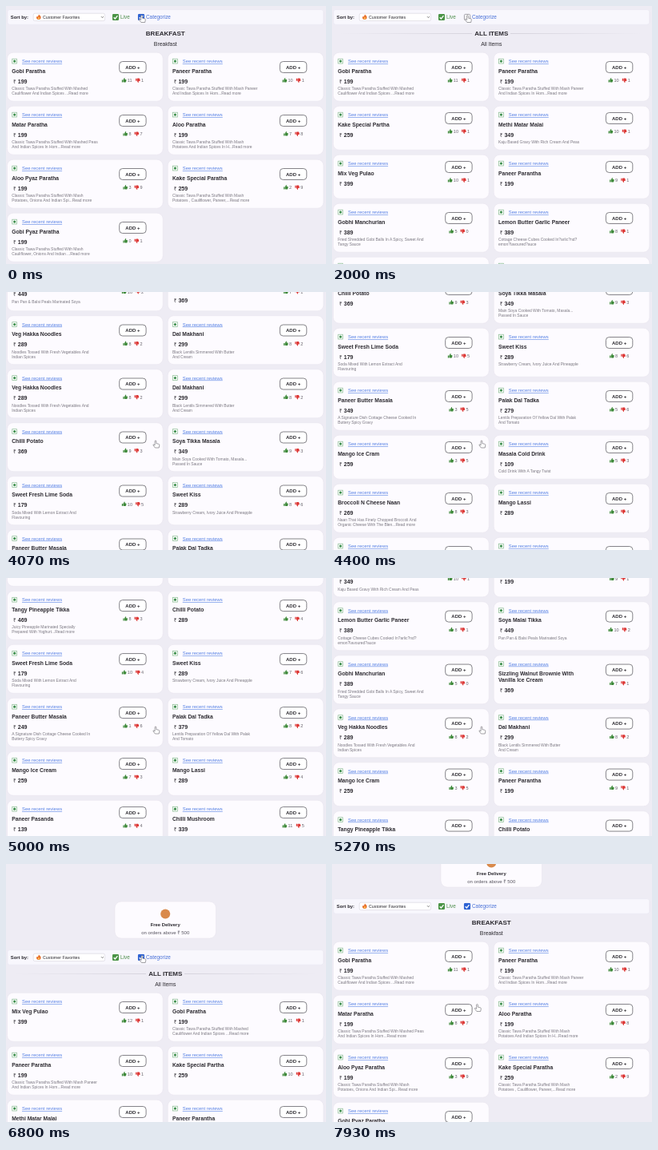
These frames come from a looping animation (400 by 323 pixels, 8 s). An HTML page:

```html
<!DOCTYPE html>
<html lang="en">
<head>
<meta charset="utf-8">
<title>Menu sorting</title>
<style>
  html, body { margin: 0; width: 100%; height: 100%; overflow: hidden; background: #eeecf4; }
  svg { display: block; width: 100vw; height: 100vh; font-family: "Liberation Sans", Arial, sans-serif; fill: #2c2a30; }
  .b { font-weight: bold; }
  .link { font-size: 5.9px; fill: #5681e4; text-decoration: underline; text-decoration-thickness: .5px; }
  .name { font-size: 6.75px; font-weight: bold; }
  .price { font-size: 7.1px; font-weight: bold; }
  .desc { font-size: 4.96px; fill: #7b7881; }
  .count { font-size: 5.5px; fill: #65626a; }
  .card { fill: #fdfbff; stroke: #e4e1eb; stroke-width: .5; }
  .mid { text-anchor: middle; }
</style>
</head>
<body>
<svg id="stage" viewBox="0 0 400 323" preserveAspectRatio="none">
  <defs>
    <path id="thumb" d="M0 2.3h1.3v3H0zM1.7 2.3 3 0q1 0 .8 1.2L3.6 2h1.6q.7.4.2 1.2.3.5-.1.9.1.5-.3.7 0 .6-.7.6H2.4l-.7-.4z"/>
    <path id="tick" d="M1.7 4.2 3.4 6 6.5 2.2" fill="none" stroke="#fff" stroke-width="1.3"/>
    <linearGradient id="fade">
      <stop offset="0" stop-color="#a5a1ae" stop-opacity="0"/>
      <stop offset="1" stop-color="#a5a1ae" stop-opacity=".55"/>
    </linearGradient>
  </defs>
  <rect width="400" height="323" fill="#eeecf4"/>
  <g id="page"></g>
  <g id="cursor" stroke="#66646a" stroke-width=".6" stroke-linejoin="round" fill="#fff">
    <path id="hand" d="M-.9 0q.9-1.2 1.7 0v3.1l3 .7q1.1.3 1 1.5l-.6 3.2H-.6L-3 5.3q-.2-1.3 1-.8L-.9 5.4z"/>
    <path id="arrow" d="M0 0v7l1.7-1.5L2.9 8.3l1.2-.5-1.2-2.7h2.2z"/>
  </g>
</svg>
<script>
const LOOP = 8000, STEP = 1000 / 15;
const $ = id => document.getElementById(id);

// Each dish: name | price | likes | dislikes | description ("/" breaks a line)
const mash = "Classic Tawa Paratha Stuffed With ";
const gobi = `Gobi Paratha|199|11|1|${mash}Mashed/Cauliflower And Indian Spices ...Read more`;
const paneer = `Paneer Paratha|199|10|1|${mash}Mash Paneer/And Indian Spices In Hom...Read more`;
const kake = "Kake Special Partha|259|10|1";
const methi = "Methi Matar Malai|349|10|1|Kaju Based Gravy With Rich Cream And Peas";
const parantha = "Paneer Parantha|199|9|1";
const manchurian = "Gobhi Manchurian|389|5|0|Fried Shredded Gobi Balls In A Spicy, Sweet And/Tangy Sauce";
const lemon = "Lemon Butter Garlic Paneer|389|8|1|Cottage Cheese Cubes Cooked In?arlic?nd?/emon?lavoured?auce";
const tikka = "Soya Malai Tikka|449|10|2|Pan Pan & Balsi Peals Marinated Soya";
const brownie = "Sizzling Walnut Brownie With/Vanilla Ice Cream|369|7|1";
const filler = [
  "Veg Hakka Noodles|289|8|2|Noodles Tossed With Fresh Vegetables And/Indian Spices",
  "Dal Makhani|299|8|2|Black Lentils Simmered With Butter/And Cream"];
const soda = "Sweet Fresh Lime Soda|179|10|5|Soda Mixed With Lemon Extract And/Flavouring";
const kiss = "Sweet Kiss|289|8|6|Strawberry Cream, Ivory Juice And Pineapple";
const masala = "Paneer Butter Masala|349|3|5|A Signature Dish Cottage Cheese Cooked In/Buttery Spicy Gravy";
const palak = "Palak Dal Tadka|279|5|6|Lentils Preparation Of Yellow Dal With Palak/And Tomato";
const iceCream = "Mango Ice Cram|259|3|5";
const lassi = "Mango Lassi|289|9|4";

const lists = {
  breakfast: [
    gobi, paneer,
    `Matar Paratha|199|8|7|${mash}Mashed Peas/And Indian Spices In Hom...Read more`,
    `Aloo Paratha|199|7|8|${mash}Mash/Potatoes And Indian Spices In H...Read more`,
    `Aloo Pyaz Paratha|199|3|9|${mash}Mash/Potatoes, Onions And Indian Spi...Read more`,
    `Kake Special Paratha|259|2|9|${mash}Mash/Potatoes , Cauliflower, Paneer,...Read more`,
    `Gobi Pyaz Paratha|199|0|1|${mash}Mash/Cauliflower, Onions And Indian ...Read more`],
  all: [
    gobi, paneer, kake, methi, "Mix Veg Pulao|399|10|1", parantha,
    manchurian, lemon, tikka, brownie, ...filler, ...filler,
    "Chilli Potato|369|9|3",
    "Soya Tikka Masala|349|9|3|Main Soya Cooked With Tomato, Masala.../Passed In Sauce",
    soda, kiss, masala, palak, iceCream,
    "Masala Cold Drink|109|5|3|Cold Drink With A Tangy Twist",
    "Broccoli N Cheese Naan|269|8|3|Naan That Has Finely Chopped Broccoli And/Organic Cheese With The Blen...Read more",
    lassi, ...filler],
  resorted: [
    "Mix Veg Pulao|399|12|1", gobi, paneer, kake, methi, parantha,
    lemon, tikka, manchurian, brownie, ...filler, iceCream, parantha,
    "Tangy Pineapple Tikka|469|8|3|Juicy Pineapple Marinated Specially/Prepared With Yoghurt...Read more",
    "Chilli Potato|289|7|4",
    soda.replace("|5|", "|4|"), kiss.replace("8|6", "7|6"), masala.replace("349|3|5", "249|1|6"),
    palak.replace("279|5|6", "379|8|2"), "Mango Ice Cream|259|7|3", lassi,
    "Paneer Pasanda|139|8|4", "Chilli Mushroom|339|11|5"]
};

const text = (x, y, s, cls, extra = "") =>
  `<text x="${x}" y="${y}" class="${cls}" ${extra}>${s.replace(/&/g, "&amp;")}</text>`;
const parse = s => {
  const [name, price, up, down, desc = ""] = s.split("|");
  return { names: name.split("/"), price, up, down, lines: desc ? desc.split("/") : [] };
};
const heightOf = d => d.lines.length > 1 ? 61 : d.names.length > 1 ? 57 : 55;

function votes(d, y) {
  const digit = 3.06;
  const width = 18.1 + digit * (d.up.length + d.down.length);
  const x1 = 158.5 - width / 2, n1 = x1 + 7;
  const x2 = n1 + digit * d.up.length + 4.1;
  return `<use href="#thumb" x="${x1}" y="${y - 2.9}" fill="#3f8a3b"/>` + text(n1, y + 2, d.up, "count") +
    `<use href="#thumb" transform="translate(${x2} ${y + 3}) scale(1 -1)" fill="#dd3a38"/>` +
    text(x2 + 7, y + 2, d.down, "count");
}

function card(d, x, y, h) {
  const shift = (d.names.length - 1) * 8, mid = h / 2;
  return `<g transform="translate(${x} ${y})">
    <rect class="card" x="1.5" y=".2" width="194.7" height="${h}" rx="7.5"/>
    <rect x="7.8" y="8.2" width="5.8" height="5.8" fill="#fff" stroke="#85b98d" stroke-width=".7"/>
    <circle cx="10.7" cy="11.1" r="1.6" fill="#3d8f4d"/>` +
    text(20, 13, "See recent reviews", "link") +
    d.names.map((s, i) => text(7.2, 25.5 + 7.6 * i, s, "name")).join("") +
    text(9, 38.5 + shift, "₹", "", 'font-size="6.4"') +
    text(14.7, 38.5 + shift, d.price, "price") +
    d.lines.map((s, i) => text(7.2, 47.2 + 6 * i + shift, s, "desc")).join("") +
    `<rect x="141.7" y="${mid - 19}" width="33.4" height="14" rx="4" fill="#fff" stroke="#5d5b62" stroke-width=".75"/>` +
    text(158.4, mid - 9.8, "ADD +", "b mid", 'font-size="6"') + votes(d, mid + 4.5) + "</g>";
}

function section(id, heading, label) {
  const dishes = lists[id].map(parse);
  let y = 58, out = "";
  for (let i = 0; i < dishes.length; i += 2) {
    const row = dishes.slice(i, i + 2), h = Math.max(...row.map(heightOf));
    row.forEach((d, col) => out += card(d, col * 200.7, y, h));
    y += h + 6;
  }
  const lines = id === "breakfast" ? "" :
    `<rect x="10" y="34" width="165" height=".6" fill="url(#fade)"/>
     <rect x="10" y="34" width="165" height=".6" fill="url(#fade)" transform="translate(398 0) scale(-1 1)"/>`;
  return `<g id="${id}">${lines}` + text(199.3, 36.6, heading, "b mid", 'font-size="8"') +
    text(199.3, 49.8, label, "mid", 'font-size="6.85"') + out + "</g>";
}

$("page").innerHTML =
  `<rect class="card" x="136" y="-56" width="126.5" height="46" rx="8"/>
   <circle cx="199.2" cy="-40.5" r="6" fill="#d98a4b"/>` +
  text(199.2, -25, "Free Delivery", "b mid", 'font-size="5.9"') +
  text(199.2, -15.4, "on orders above ₹ 500", "mid", 'font-size="6" fill="#55525c"') +
  `<rect x="1.8" y="4.6" width="395" height="18.6" rx="3" fill="#f8f7fd" stroke="#e5e2ee" stroke-width=".5"/>` +
  text(5.8, 16, "Sort by:", "b", 'font-size="5.9"') +
  `<rect x="34.2" y="9.2" width="89.4" height="9.4" rx="2" fill="#fff" stroke="#d5d2dc" stroke-width=".6"/>
   <path d="M41 10.6q2.8 2 2.6 4.4-.3 2.1-2.8 2.1T38 15q-.1-1.3.9-2.3l.6.8q1.3-1.2 1.5-2.9z" fill="#e8702c"/>
   <path d="M41 13.8q1.4 1.2.9 2.3-.9.9-1.9 0-.5-1 1-2.3z" fill="#ffce55"/>
   <path d="M119 13.2l1.4 1.4 1.4-1.4" fill="none" stroke="#444" stroke-width=".7"/>` +
  text(46, 15.8, "Customer Favorites", "", 'font-size="5.3"') +
  `<rect x="133" y="10" width="8" height="8" rx="1.2" fill="#4a9445"/><use href="#tick" x="133" y="10"/>` +
  text(143, 16.2, "Live", "", 'font-size="6.4" fill="#4f8f4c"') +
  `<rect id="box" x="165.4" y="10.4" width="7.2" height="7.2" rx="1.2" fill="#fff" stroke-width=".8"/>
   <g id="checked"><rect x="165" y="10" width="8" height="8" rx="1.2" fill="#2d62d3"/><use href="#tick" x="165" y="10"/></g>` +
  text(175, 16.2, "Categorize", "", 'font-size="6.4" fill="#4a72d8"') +
  section("breakfast", "BREAKFAST", "Breakfast") +
  section("all", "ALL ITEMS", "All Items") +
  section("resorted", "ALL ITEMS", "All Items");

const scrollKeys = [[3400, 0], [3730, 68], [4330, 533], [4940, 533], [5000, 499], [5530, -35], [5930, -35], [6600, -103], [7800, -103], [7930, -39]];
const xKeys = [[3270, 169.5], [3600, 187], [5930, 187], [6600, 170], [7200, 170], [7730, 181.5]];
const yKeys = [[3270, 12], [3600, 186.5], [5930, 186.5], [6600, 115], [7200, 115], [7730, 176]];

// Eased interpolation between [time, value] pairs, held at both ends
function at(keys, t) {
  const i = keys.findIndex(k => k[0] > t);
  if (i === 0) return keys[0][1];
  if (i < 0) return keys[keys.length - 1][1];
  const [t0, a] = keys[i - 1], [t1, b] = keys[i];
  const p = (t - t0) / (t1 - t0);
  return a + (b - a) * p * p * (3 - 2 * p);
}
const show = (id, on) => $(id).style.display = on ? "" : "none";

function draw(time) {
  const t = Math.floor((time % LOOP + 4) / STEP) * STEP + 4;
  $("page").setAttribute("transform", `translate(0 ${-at(scrollKeys, t)})`);
  show("breakfast", t < 1000 || t >= 7200);
  show("all", t >= 1000 && t < 5000);
  show("resorted", t >= 5000 && t < 7200);
  show("checked", t < 730 || t >= 6800);
  // Grey while hovered, blue once the pointer has left
  $("box").setAttribute("stroke", t < 3270 ? "#8d8b93" : "#4a72d8");
  const arrow = t >= 3330 && t < 3800;
  show("arrow", arrow);
  show("hand", !arrow);
  $("cursor").setAttribute("transform", `translate(${at(xKeys, t)} ${at(yKeys, t)})`);
}

const start = performance.now();
function tick() {
  draw(performance.now() - start);
  requestAnimationFrame(tick);
}
tick();
</script>
</body>
</html>
```
